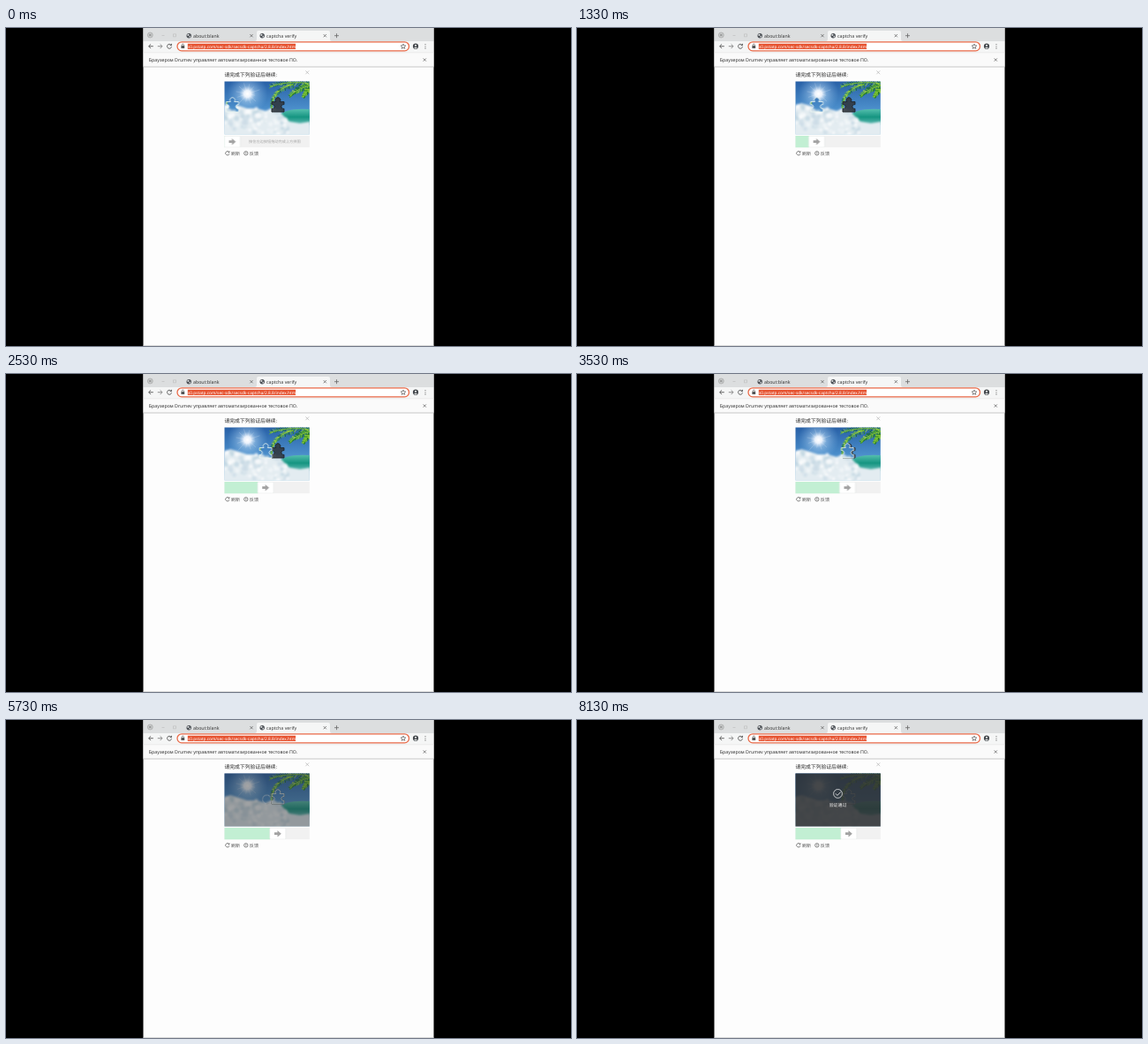
Write an HTML page that moves like this. It is 640 px wide and 360 px high and loops after 8.94 s.

```html
<!DOCTYPE html>
<html lang="ru">
<head>
<meta charset="utf-8">
<title>captcha verify</title>
<style>
html, body { margin: 0; width: 100%; height: 100%; overflow: hidden; background: #000; }
svg { display: block; width: 640px; height: 360px; }
text { font-family: "Noto Sans", "Open Sans", sans-serif; font-size: 5.25px; fill: #333; text-rendering: geometricPrecision; }
.cjk { font-family: "Noto Sans CJK SC", "Noto Sans CJK", sans-serif; }
.line { fill: none; stroke: #666; stroke-width: .8; }
.drag, .hint, .veil, .spin, .turn, .done { animation: 8940ms linear infinite; }
.drag { animation-name: drag; }
.hint { animation-name: hint; }
.veil { animation-name: veil; }
.spin { animation-name: spin; }
.turn { animation-name: turn; transform-origin: 295.5px 90px; }
.done { animation-name: done; }

/* The pointer moves on a 15 fps grid: overshoot, step back, then settle. */
@keyframes drag {
  0% { transform: translateX(-51.5px); animation-timing-function: step-end; }
  5.22% { transform: translateX(-51.5px); animation-timing-function: steps(44); }
  38.03% { transform: translateX(3.8px); animation-timing-function: steps(2); }
  39.48% { transform: translateX(-1.5px); animation-timing-function: step-end; }
  49.96% { transform: translateX(-1.5px); animation-timing-function: steps(12); }
  58.9%, 100% { transform: none; }
}
@keyframes hint {
  0% { opacity: 1; animation-timing-function: step-end; }
  5.22%, 100% { opacity: 0; }
}
@keyframes veil {
  0%, 62.5% { opacity: 0; animation-timing-function: steps(4); }
  65.5%, 100% { opacity: 1; }
}
@keyframes spin {
  0%, 63.3% { opacity: 0; }
  65.5%, 87.2% { opacity: 1; }
  88%, 100% { opacity: 0; }
}
@keyframes turn {
  0%, 62.5% { transform: rotate(0); animation-timing-function: steps(34); }
  88%, 100% { transform: rotate(816deg); }
}
@keyframes done {
  0%, 87.2% { opacity: 0; animation-timing-function: steps(4); }
  90.9%, 100% { opacity: 1; }
}
</style>
</head>
<body>
<svg viewBox="0 0 640 360">
  <defs>
    <linearGradient id="sky" x1="0" y1="0" x2="0" y2="1">
      <stop offset="0" stop-color="#2860a6"/>
      <stop offset=".5" stop-color="#4a8dca"/>
      <stop offset="1" stop-color="#a9cfe2"/>
    </linearGradient>
    <radialGradient id="sun">
      <stop offset="0" stop-color="#fff"/>
      <stop offset=".17" stop-color="#f3f8ff" stop-opacity=".95"/>
      <stop offset=".4" stop-color="#b5d7f4" stop-opacity=".5"/>
      <stop offset="1" stop-color="#8abce8" stop-opacity="0"/>
    </radialGradient>
    <linearGradient id="wave" x1="0" y1="0" x2="0" y2="1">
      <stop offset="0" stop-color="#55bfae"/>
      <stop offset=".5" stop-color="#159581"/>
      <stop offset="1" stop-color="#69bdb8"/>
    </linearGradient>
    <filter id="soft" x="-10%" y="-20%" width="120%" height="140%"><feGaussianBlur stdDeviation=".9"/></filter>
    <path id="jig" d="M301 83.5h4.8a2.9 2.9 0 1 1 4.4 0h4.8v3.2a2.4 2.4 0 1 0 0 4.6v3.7h-14v-3.7a2.4 2.4 0 1 0 0-4.6z"/>
    <clipPath id="photoBox"><path d="M247.5 60.5h96.3v60h-96.3z"/></clipPath>
    <clipPath id="trackBox"><path d="M247.5 122h96.3v13.3h-96.3z"/></clipPath>
    <clipPath id="jigBox"><use href="#jig"/></clipPath>
    <g id="globe">
      <circle r="2.7" fill="#4b4f54"/>
      <path d="M-1.9-1.2l1.5-.7.8 1-1.1 1.1-.9-.2zM.3.4l1.6-.3-.5 1.6-.9.3z" fill="#e3e5e8"/>
    </g>
    <path id="cross" d="M-1.6-1.6l3.2 3.2M1.6-1.6l-3.2 3.2"/>
    <g id="scene">
      <path d="M247 60h98v61h-98z" fill="url(#sky)"/>
      <circle cx="273.5" cy="74.5" r="23" fill="url(#sun)"/>
      <g id="rays" stroke="#fff" stroke-width=".5" opacity=".35"/>
      <path d="M306 101q10-11 38-9v18h-38z" fill="url(#wave)"/>
      <g id="foam" filter="url(#soft)">
        <path d="M246 89l8-4 10 3 9 3 11 0 10 3 9-4 9 7 9 9 12 2 12-2v16h-99z" fill="#e3ecf1"/>
      </g>
      <g id="palm" fill="none" stroke-linecap="round"/>
    </g>
  </defs>

  <path d="M155.5 0h329v360h-329z" fill="#fdfdfd"/>

  <!-- tabs -->
  <path d="M155.5 0h329v15h-329z" fill="#dcdedf"/>
  <path d="M282 15q2 0 2-2.5V5q0-2 2-2h79q2 0 2 2v7.500q0 2.500 2 2.500z" fill="#f5f6f6"/>
  <circle cx="163.300" cy="8" r="3" fill="#c8caca" stroke="#999" stroke-width=".5"/>
  <g class="line">
    <use href="#cross" transform="translate(163.300 8) scale(.7)"/>
    <path d="M176.500 8.500h3M189.500 6.800h3v3h-3z" stroke="#bbb" stroke-width=".6"/>
    <use href="#cross" x="278" y="8.700"/>
    <use href="#cross" x="361.300" y="8.700"/>
    <path d="M372 8.700h5M374.500 6.200v5"/>
  </g>
  <use href="#globe" x="207.200" y="8.700"/>
  <use href="#globe" x="290.200" y="8.700"/>
  <text x="212" y="10.500">about:blank</text>
  <text x="295" y="10.500">captcha verify</text>

  <!-- toolbar -->
  <path d="M155.5 15h329v12.800h-329z" fill="#f5f6f6"/>
  <g class="line">
    <path d="M166.800 20.700h-5M164 18.300l-2.400 2.400 2.400 2.400" stroke="#444"/>
    <path d="M171.800 20.700h5M174.600 18.300l2.400 2.400-2.400 2.400" stroke="#777"/>
    <path d="M187 19.200a2.500 2.500 0 1 0 .5 2M187.500 17.800v1.900h-1.900" stroke="#444"/>
  </g>
  <rect x="194" y="15.800" width="262.500" height="10" rx="5" fill="#fff" stroke="#e96a48" stroke-width="1.300"/>
  <path d="M198.400 20h3.800v3h-3.800z" fill="#555"/>
  <path class="line" d="M199.200 20v-.8a1.100 1.100 0 0 1 2.200 0v.8" stroke-width=".6"/>
  <path d="M205.800 17.700h122.300v6.300h-122.300z" fill="#e6522f"/>
  <text x="206" y="22.500" style="font-size:4.750px;fill:#fff">s0.pstatp.com/sec-sdk/secsdk-captcha/2.8.8/index.html</text>
  <path class="line" stroke-width=".6" d="M450 18l.8 1.800 2 .2-1.500 1.300.5 2-1.800-1.100-1.800 1.100.5-2-1.500-1.300 2-.2z"/>
  <circle cx="464" cy="20.700" r="3.100" fill="#45494d"/>
  <circle cx="464" cy="19.700" r="1" fill="#f5f6f6"/>
  <path d="M462.100 22.500q1.900-1.600 3.800 0-1.900 1.400-3.800 0z" fill="#f5f6f6"/>
  <path d="M475 18.500v4.600" stroke="#555" stroke-width="1.100" stroke-linecap="round" stroke-dasharray="0 2.200"/>

  <!-- notice bar -->
  <path d="M155.5 27.800h329v16h-329z" fill="#fafafa"/>
  <path d="M155.5 27.800h329" stroke="#dfdfdf" stroke-width=".6"/>
  <path d="M155.5 44h329" stroke="#b9b9b9" stroke-width=".8"/>
  <text x="161.800" y="38">Браузером Drumev управляет автоматизированное тестовое ПО.</text>
  <use class="line" href="#cross" x="474.300" y="36"/>

  <!-- captcha card -->
  <text class="cjk" x="247.500" y="55" style="font-size:5.800px;fill:#222">请完成下列验证后继续:</text>
  <use href="#cross" transform="translate(341.300 50.300) scale(1.200)" stroke="#aaa" stroke-width=".5"/>
  <g clip-path="url(#photoBox)">
    <use href="#scene"/>
    <use href="#jig" fill="#30363d" fill-opacity=".88" stroke="#20252b" stroke-width=".9"/>
    <g class="drag">
      <g clip-path="url(#jigBox)"><use href="#scene"/></g>
      <use href="#jig" fill="none" stroke="#eef8f2" stroke-width=".8"/>
    </g>
    <path class="veil" d="M247 60h98v61h-98z" fill="#303234" fill-opacity=".89"/>
    <g class="spin" fill="none" stroke-width="1">
      <circle cx="295.500" cy="90" r="5" stroke="#777"/>
      <path class="turn" d="M299 93.500a5 5 0 1 1 1.500-3.500" stroke="#c8c8c8"/>
    </g>
    <g class="done">
      <circle cx="295.500" cy="83.400" r="4.900" fill="none" stroke="#eee" stroke-width=".8"/>
      <path d="M292.900 83.300l2 2.100 3.800-3.900" fill="none" stroke="#eee" stroke-width=".9"/>
      <text class="cjk" x="295.500" y="98.300" text-anchor="middle" style="font-size:4.900px;fill:#f2f2f2">验证通过</text>
    </g>
  </g>

  <!-- slider -->
  <g clip-path="url(#trackBox)">
    <path d="M247 122h98v14h-98z" fill="#f1f1f1"/>
    <text class="cjk hint" x="275" y="130.200" style="font-size:4.200px;fill:#a5a5a5">按住左边按钮拖动完成上方拼图</text>
    <g class="drag">
      <path d="M190 122h109v14h-109z" fill="#c2efd3"/>
      <rect x="298.800" y="122.300" width="18" height="12.700" rx="1.200" fill="#fff" stroke="#e3e6e4" stroke-width=".5"/>
      <path d="M304 127.300h3.500v-2.300l4.300 3.700-4.300 3.700v-2.300h-3.500z" fill="#a2a2a2"/>
    </g>
  </g>

  <g class="line" stroke-width=".7">
    <path d="M252.700 140.500a2.200 2.200 0 1 0 .3 1.900M253 139.300v1.600h-1.600"/>
    <circle cx="271.800" cy="141.800" r="2.200"/>
    <path d="M271.800 140.600v1.400M271.800 142.600v.5"/>
  </g>
  <text class="cjk" x="255" y="143.600" style="font-size:5.100px;fill:#555">刷新</text>
  <text class="cjk" x="275.800" y="143.600" style="font-size:5.100px;fill:#555">反馈</text>
  <path d="M155.500 359.600h329" stroke="#bbb" stroke-width=".6"/>
</svg>
<script>
const add = (id, name, attrs) => {
  const el = document.createElementNS('http://www.w3.org/2000/svg', name);
  for (const k in attrs) el.setAttribute(k, attrs[k]);
  document.getElementById(id).append(el);
};
let seed = 11;
const rnd = () => (seed = seed * 16807 % 2147483647) / 2147483647;

for (let i = 0; i < 12; i++) {
  const a = i * Math.PI / 6 + .2, r = 9 + rnd() * 8;
  add('rays', 'path', { d: `M273.5 74.5l${Math.cos(a) * r} ${Math.sin(a) * r}` });
}

// Cloud and spray puffs, denser towards the lower left.
for (let i = 0; i < 110; i++) {
  const x = 247 + rnd() * 72;
  add('foam', 'circle', {
    cx: x, cy: 87 + (x - 247) * .12 + rnd() * 27, r: .8 + rnd() * 2.4,
    fill: ['#fff', '#f4f8fa', '#cbdce6', '#bdd4e0'][i % 4], opacity: .7
  });
}

// A frond is a curved rib with leaflets on both sides.
const frond = (x0, y0, cx, cy, x1, y1, size) => {
  const at = (a, b, c, t) => (1 - t) ** 2 * a + 2 * t * (1 - t) * b + t * t * c;
  for (let i = 0; i < 20; i++) {
    const t = i / 19, x = at(x0, cx, x1, t), y = at(y0, cy, y1, t);
    const dir = Math.atan2(y1 - y0, x1 - x0);
    for (const side of [-1, 1]) {
      const a = dir + side * .9, r = size * (1 - t * .6) * (.7 + rnd() * .5);
      add('palm', 'path', {
        d: `M${x} ${y}l${Math.cos(a) * r} ${Math.sin(a) * r}`,
        stroke: ['#2f8f1f', '#69bd26', '#a3d83a', '#1f6f26'][Math.floor(rnd() * 4)],
        'stroke-width': .9
      });
    }
  }
  add('palm', 'path', { d: `M${x0} ${y0}Q${cx} ${cy} ${x1} ${y1}`, stroke: '#8cc835', 'stroke-width': .8 });
};
frond(345, 63, 320, 59, 300, 66, 5);
frond(345, 65, 330, 68, 322, 77, 5);
frond(345, 68, 340, 72, 337, 78, 4);
frond(325, 64, 301, 70, 301, 90, 3.500);
</script>
</body>
</html>
```
